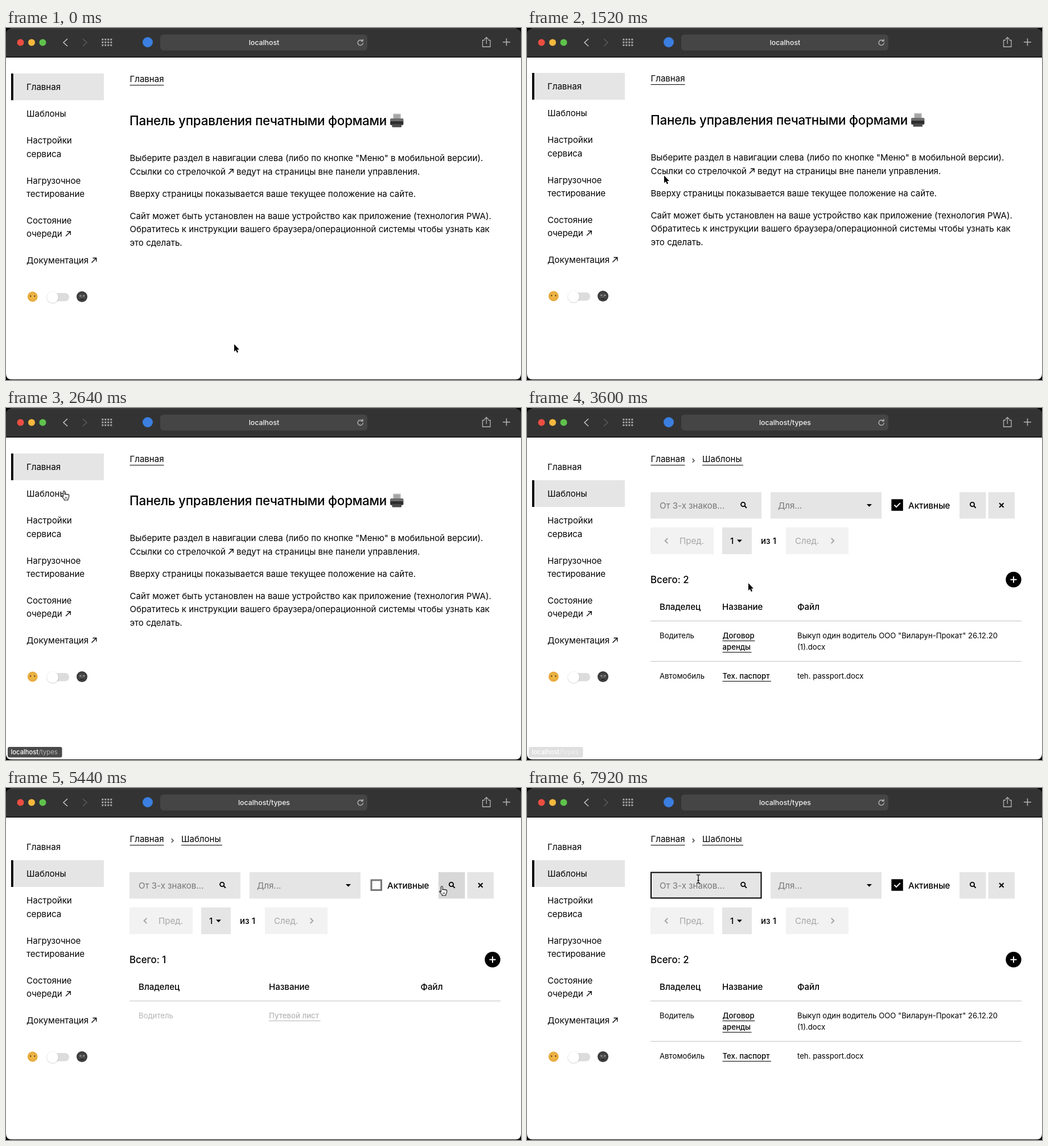
An HTML page for the animation above (8 s loop, 905 by 619 pixels).

```html
<!DOCTYPE html>
<html lang="ru">
<head>
<meta charset="utf-8">
<style>
html, body { margin: 0; width: 100%; height: 100%; overflow: hidden; background: #000; }
svg { display: block; width: 905px; height: 619px; }
text { font: 400 15.1px Inter, "Open Sans", sans-serif; font-optical-sizing: none; letter-spacing: -.015px; white-space: pre; }
.b { font-weight: 500; }
.h1 { font-weight: 500; font-size: 22.4px; letter-spacing: -.24px; }
.total { font-weight: 500; font-size: 16.8px; }
.s, .sb { font-size: 13.2px; letter-spacing: 0; }
.sb { font-weight: 500; }
#url { font-weight: 500; font-size: 12.3px; letter-spacing: 0; text-anchor: middle; }
.tip { font-size: 11.2px; letter-spacing: 0; fill: #b8b8b8; }
.tip tspan { font-weight: 500; fill: #fff; }
.l { fill: none; stroke: #000; stroke-width: 1.5; }
.bold { stroke-width: 2; }
.thin { stroke-width: 1.3; }
.off { fill: #a6a6a6; }
</style>
</head>
<body>
<svg id="stage" viewBox="0 0 905 619"></svg>
<script>
const LOOP = 8000, STEP = 80;

const text = (x, y, s, cls = '', fill = '#000') => `<text x="${x}" y="${y}" class="${cls}" fill="${fill}">${s}</text>`;
const rect = (x, y, w, h, fill, r = 0, more = '') => `<rect x="${x}" y="${y}" width="${w}" height="${h}" rx="${r}" fill="${fill}" ${more}/>`;
const circle = (x, y, r, fill, more = '') => `<circle cx="${x}" cy="${y}" r="${r}" fill="${fill}" ${more}/>`;
const line = (d, color = '#000', cls = '') => `<path class="l ${cls}" d="${d}" style="stroke:${color}"/>`;
const group = (id, s) => `<g id="${id}">${s}</g>`;
const rule = (x, y, w, color = '#222') => rect(x, y, w, 1, color);
const link = (x, y, s, w, cls = '', fill = '#000', gap = 5) => text(x, y, s, cls, fill) + rule(x, y + gap, w, fill);
const arrow = (x, y) => line(`M${x} ${y}l8.2 -8.2m-6.2 0h6.2v6.2`, '#000', 'thin');
const lens = (x, y) => circle(x, y, 3.6, 'none', 'stroke="#000" stroke-width="1.9"') + line(`M${x + 2.6} ${y + 2.6}l3.6 3.6`, '#000', 'bold');
const caret = (x, y) => `<path d="M${x} ${y}h9l-4.5 4.8z"/>`;

function toolbar() {
  let dots = '';
  for (let i = 0; i < 12; i++) dots += rect(168.3 + i % 4 * 5, 18.7 + (i >> 2) * 5, 3, 3, '#a6a6a6', .6);
  return '<path d="M0 51V11Q0 1 10 1H895Q905 1 905 11V51Z" fill="#333"/>' +
    rect(8, .5, 889, 1, '#5c5c5c') + rect(0, 50.5, 905, 1.5, '#111') +
    circle(25.5, 25.5, 6, '#ec4e42') + circle(45, 25.5, 6, '#f5b83d') + circle(64.5, 25.5, 6, '#5fc24c') +
    line('M108 19l-7 6.5 7 6.5', '#c8c8c8') + line('M135 19l7 6.5 -7 6.5', '#5c5c5c') + dots +
    circle(249, 25, 9, '#3b7fe0') + rect(271, 11.5, 364, 28, '#454545', 6) +
    '<text id="url" x="453.5" y="30" fill="#f2f2f2"></text>' +
    line('M626 22.5a4.6 4.6 0 1 0 1.4 3.5M627 19.5v3.6h-3.6', '#bdbdbd', 'thin') +
    line('M841 21.5h-3.5v11.5h13.5v-11.5h-3.5M844.2 28v-11.5m-3.6 3.5l3.6 -3.6 3.6 3.6', '#b5b5b5', 'thin') +
    line('M873 24.8h13M879.5 18.3v13', '#b5b5b5');
}

function sidebar() {
  const items = [[109, 'Главная'], [156, 'Шаблоны'], [203, 'Настройки'], [227, 'сервиса'], [274, 'Нагрузочное'],
    [297, 'тестирование'], [344, 'Состояние'], [367, 'очереди'], [414, 'Документация']];
  return group('active', rect(9, 80, 163, 47, '#e5e5e5') + rect(9, 80, 3.8, 47, '#000')) +
    items.map(([y, s]) => text(36, y, s)).join('') + arrow(105, 366) + arrow(150.5, 412.7) +
    circle(46.7, 472.5, 8.9, 'url(#sun)') + circle(43.2, 471.5, 1.2, '#5d3a12') + circle(50.2, 471.5, 1.2, '#5d3a12') +
    rect(74, 466, 37, 14.5, '#dcdcdc', 7) + circle(82, 474, 11, '#000', 'opacity=".09"') + circle(82, 473.3, 10, '#fff') +
    circle(133.5, 472.5, 9.5, 'url(#moon)') + circle(130.5, 471, 1.2, '#aaa') + circle(137, 471, 1.2, '#aaa') +
    line('M130.5 476.5q3 1.5 6 0', '#222');
}

const printer = rect(680, 150.5, 14, 12, '#c9c9c9', 1) + rect(681.5, 152, 11, 9, '#a5a5a5') +
  rect(675, 159, 23.5, 12, '#6d6d6d', 2) + rect(675.5, 164, 22.5, 6, '#2e2e2e', 1) + rect(678.5, 169, 16.5, 5.5, '#4b4b4b', 1);

function home() {
  return link(217.5, 95, 'Главная', 60) +
    text(217, 170.5, 'Панель управления печатными формами', 'h1') + printer +
    text(217.5, 234, 'Выберите раздел в навигации слева (либо по кнопке "Меню" в мобильной версии).') +
    text(217.5, 258, 'Ссылки со стрелочкой') + arrow(391, 256.7) + text(405, 258, 'ведут на страницы вне панели управления.') +
    text(217.5, 297, 'Вверху страницы показывается ваше текущее положение на сайте.') +
    text(217.5, 336, 'Сайт может быть установлен на ваше устройство как приложение (технология PWA).') +
    text(217.5, 359, 'Обратитесь к инструкции вашего браузера/операционной системы чтобы узнать как') +
    text(217.5, 383, 'это сделать.');
}

function templates() {
  return link(217.5, 95, 'Главная', 60) + line('M290.8 89l3.2 3.4 -3.2 3.4', '#444') + link(308, 95, 'Шаблоны', 72) +
    rect(217, 148, 195, 46.5, '#e5e5e5') + text(233, 176.5, 'От 3-х знаков...', '', '#777') + lens(379.7, 169.5) +
    rect(428, 148, 195, 46.5, '#e5e5e5') + text(441, 176.5, 'Для...', '', '#777') + caret(597, 169) +
    rect(642, 162, 17.5, 17.5, '#fff', 0, 'stroke="#777" stroke-width="3"') +
    group('check', rect(640.5, 160.5, 20, 20, '#000') + line('M645.5 170.5l3.5 3.6 6.8 -7', '#fff', 'bold')) +
    text(670, 176.5, 'Активные', 'b') +
    rect(760, 148, 46.5, 46.5, '#e5e5e5', 0, 'id="find"') + lens(782.5, 169.5) +
    rect(810.5, 148, 46.5, 46.5, '#e5e5e5', 0, 'id="reset"') + line('M830 167.2l7.6 7.6m0 -7.6l-7.6 7.6', '#000', 'bold') +
    rect(217, 210, 111, 47, '#f2f2f2') + line('M247.3 229l-4.6 4.5 4.6 4.5', '#a6a6a6', 'bold') + text(268, 239, 'Пред.', 'off') +
    rect(343, 210, 52, 47, '#e5e5e5') + text(357, 239, '1', 'b') + caret(369, 231.5) + text(411, 239, 'из 1', 'b') +
    rect(455, 210, 110, 47, '#f2f2f2') + text(471, 239, 'След.', 'off') + line('M534.7 229l4.6 4.5 -4.6 4.5', '#a6a6a6', 'bold') +
    circle(855, 301.8, 13.7, '#000') + line('M849.5 301.8h11M855 296.3v11', '#fff', 'bold') +
    text(233, 354.5, 'Владелец', 'b') + rule(217, 374, 652, '#c2c2c2') +
    group('all', text(217, 307.5, 'Всего: 2', 'total') + text(343, 354.5, 'Название', 'b') + text(475, 354.5, 'Файл', 'b') +
      text(233, 405, 'Водитель', 's') + link(343.5, 405, 'Договор', 57, 'sb', '#000', 4) + link(343.5, 425, 'аренды', 51, 'sb', '#000', 4) +
      text(475, 405, 'Выкуп один водитель ООО "Виларун-Прокат" 26.12.20', 's') + text(475, 425, '(1).docx', 's') +
      rule(217, 445, 652, '#c2c2c2') + text(233, 476, 'Автомобиль', 's') +
      link(343.5, 476, 'Тех. паспорт', 85.5, 'sb', '#000', 4) + text(475, 476, 'teh. passport.docx', 's')) +
    group('inactive', text(217, 307.5, 'Всего: 1', 'total') + text(462, 354.5, 'Название', 'b') + text(728.5, 354.5, 'Файл', 'b') +
      text(233, 405, 'Водитель', 's', '#b5b5b5') + link(462, 405, 'Путевой лист', 90.5, 'sb', '#b5b5b5', 4)) +
    group('focus', rect(218, 148.5, 193.5, 45, 'none', 0, 'stroke="#000" stroke-width="2"'));
}

const pointers = group('arrow', '<path d="M0 0V13L2.9 10.3 4.9 15 7 14.1 5.1 9.5H9Z" stroke="#fff" stroke-width="2" paint-order="stroke"/>') +
  group('hand', '<path d="M-1.5 9V1.2a1.4 1.4 0 0 1 2.8 0V6l1.2 -.8 1.5 .9 1.2 -.6 1.4 1 1.1 -.3q1.1 .5 1.1 1.6l-.4 3.6 -1.6 3V16H.3v-1.6L-4 9.8q-.6 -1.4 .6 -1.6L-1.5 9.6z" fill="#fff" stroke="#111" stroke-width="1.1"/>' +
    line('M2.4 10.5v3M4.5 10.5v3', '#555', 'thin')) +
  group('beam', line('M-3.2 -7.5q3.2 0 3.2 2V5.5q0 2 -3.2 2M3.2 -7.5q-3.2 0 -3.2 2M3.2 7.5q-3.2 0 -3.2 -2M-2 2.5h4', '#222'));

const stage = document.getElementById('stage');
stage.innerHTML = `<defs>
  <radialGradient id="sun"><stop stop-color="#f2bd4a"/><stop offset="1" stop-color="#e6a83c"/></radialGradient>
  <radialGradient id="moon"><stop stop-color="#5a5a5a"/><stop offset="1" stop-color="#353535"/></radialGradient></defs>` +
  '<path d="M0 52H905V608Q905 618 895 618H10Q0 618 0 608Z" fill="#fff"/>' +
  group('page', sidebar() + group('home', home()) + group('templates', templates())) + toolbar() +
  group('status', rect(3, 596, 95.5, 18.5, '#4a4a4a', 3) + text(8.5, 609, '<tspan>localhost</tspan>/types', 'tip')) +
  group('cursor', pointers);

const el = id => document.getElementById(id);
const show = (id, on) => el(id).style.display = on ? '' : 'none';

// time, x, y of the pointer's hot spot
const path = [[0, 401, 556], [320, 401, 556], [800, 332, 405], [880, 332, 405], [1120, 316, 377], [1600, 235, 250],
  [1680, 235, 250], [2000, 131, 142], [2560, 102, 146], [3040, 102, 146], [3600, 389, 308], [3840, 392, 306],
  [3920, 392, 306], [4400, 650, 170], [4560, 650, 170], [4800, 766, 173], [5600, 766, 173], [6000, 832, 168],
  [6320, 832, 168], [6880, 470, 140], [7120, 309, 146], [7200, 301, 160], [LOOP, 301, 160]];

function pointer(t) {
  const i = path.findIndex(p => p[0] > t), [t0, x0, y0] = path[i - 1], [t1, x1, y1] = path[i];
  const k = (t - t0) / (t1 - t0), e = k * k * (3 - 2 * k);
  return [x0 + (x1 - x0) * e, y0 + (y1 - y0) * e];
}

function draw(now) {
  const t = Math.floor(now % LOOP / STEP) * STEP;
  const within = (a, b) => t >= a && t < b;
  const opened = t >= 2720, filtered = within(5040, 6320);
  const [x, y] = pointer(t);

  el('page').setAttribute('transform', `translate(0 ${within(960, 1600) ? -1 : 0})`);
  el('active').setAttribute('transform', `translate(0 ${opened ? 47 : 0})`);
  el('url').textContent = opened ? 'localhost/types' : 'localhost';
  show('home', !opened);
  show('templates', opened);
  show('check', !within(4480, 6320));
  show('all', !filtered);
  show('inactive', filtered);
  show('focus', t >= 7360);
  el('find').style.fill = within(4720, 5760) ? '#d8d8d8' : '';
  el('reset').style.fill = within(5840, 6400) ? '#d8d8d8' : '';

  show('status', within(1920, 3760));
  el('status').style.opacity = Math.min(1, Math.max(0, (3640 - t) / 240));

  const hand = within(1920, 3200) || within(4320, 6400), beam = t >= 7200;
  show('hand', hand);
  show('beam', beam);
  show('arrow', !hand && !beam);
  el('cursor').setAttribute('transform', `translate(${x.toFixed(1)} ${y.toFixed(1)})`);
}

let start;
function tick(now) {
  start ??= now;
  draw(now - start);
  requestAnimationFrame(tick);
}
draw(0);
requestAnimationFrame(tick);
</script>
</body>
</html>
```
